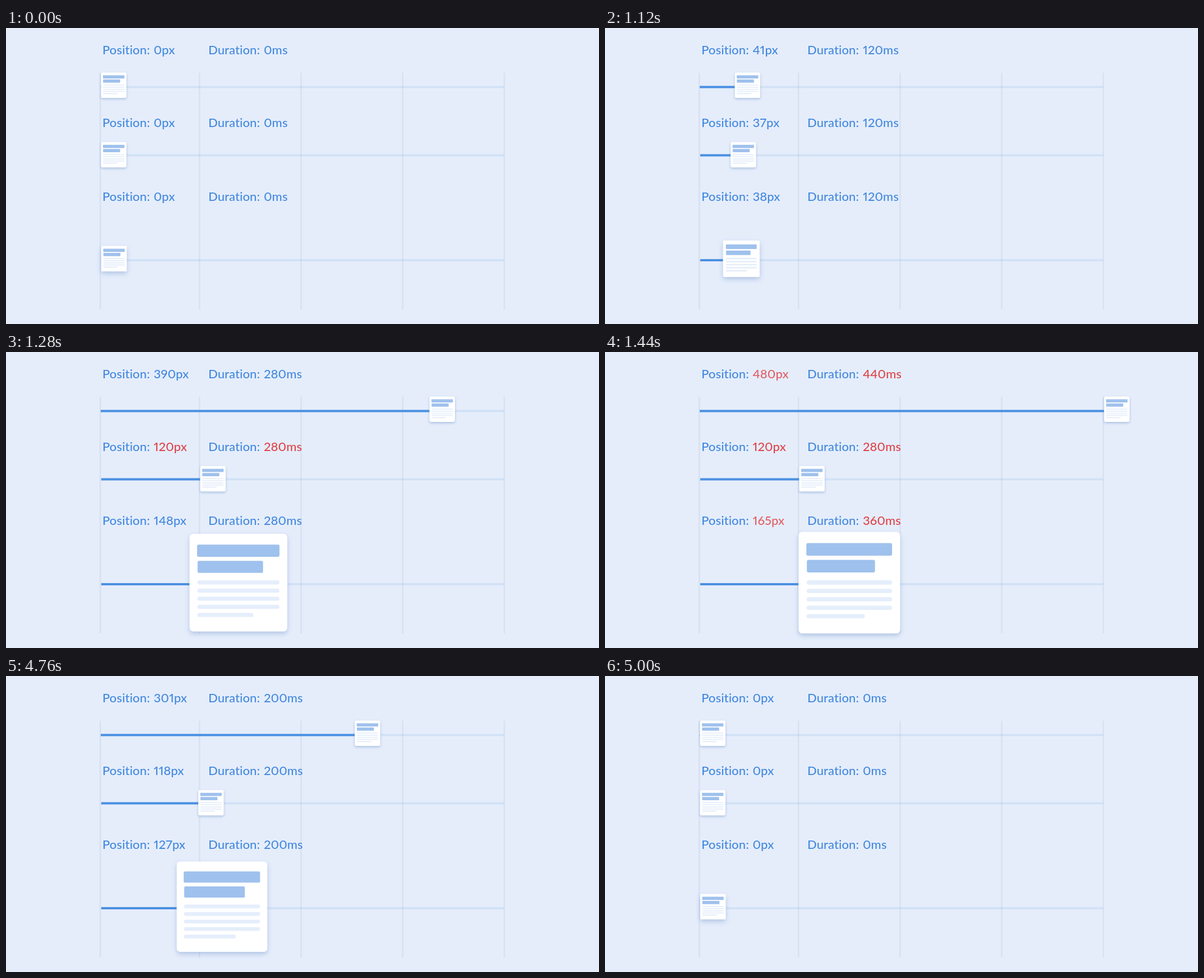
An HTML page for the animation above (6000 ms loop, 1058 by 529 pixels).

```html
<!DOCTYPE html>
<html lang="en">
<head>
<meta charset="utf-8">
<title>Duration by distance</title>
<style>
  html, body { margin: 0; width: 100%; height: 100%; overflow: hidden; background: #e5edfb; }
  svg { display: block; width: 1058px; height: 529px; }
  text { font: 500 22px Lato, "Open Sans", sans-serif; fill: #4389de; letter-spacing: .1px;
         font-variant-numeric: proportional-nums; }
  .grid { fill: #8fa6c6; fill-opacity: .17; }
  .track { fill: #d2e2f6; }
  .active { fill: #4a90e2; }
  .card { fill: #fff; filter: drop-shadow(0 2px 2px rgba(70, 115, 180, .38)); }
  .big { filter: drop-shadow(0 4px 4px rgba(70, 115, 180, .32)); }
  .title { fill: #9fc1ed; }
  .line { fill: #e5eefb; }
</style>
</head>
<body>
<svg id="stage" viewBox="0 0 1058 529"></svg>
<script>
const LOOP = 6000, STEP = 40, START = 1000, END = 5000;
const SMALL = 45.4, LARGE = 181.5;
const stage = document.getElementById('stage');

function add(parent, tag, attrs) {
  const el = document.createElementNS('http://www.w3.org/2000/svg', tag);
  set(el, attrs);
  return parent.appendChild(el);
}

function set(el, attrs) {
  for (const key in attrs) el.setAttribute(key, attrs[key]);
}

function box(parent, cls, x, y, width, height, rx = 0) {
  return add(parent, 'rect', { class: cls, x, y, width, height, rx });
}

function label(x, y, str = '') {
  const el = add(stage, 'text', { x, y });
  el.textContent = str;
  return el;
}

// Symmetric cubic Bezier (a, 0, 1 - a, 1), solved by bisection
function ease(x, a) {
  if (x <= 0 || x >= 1) return x <= 0 ? 0 : 1;
  let lo = 0, hi = 1, s;
  for (let i = 0; i < 30; i++) {
    s = (lo + hi) / 2;
    const r = 1 - s;
    if (3 * r * r * s * a + 3 * r * s * s * (1 - a) + s * s * s < x) lo = s;
    else hi = s;
  }
  return s * s * (3 - 2 * s);
}

const rows = [
  { textY: 47, trackY: 105.5, cardY: 102.2, x0: 169.5, x1: 890.5, lineX: 169,
    px: 480, dur: 440, curve: .658, grow: 0, red: '#e25f66' },
  { textY: 177, trackY: 227.5, cardY: 226.5, x0: 169.5, x1: 346.5, lineX: 170,
    px: 120, dur: 280, curve: .658, grow: 0, red: '#e0444a' },
  { textY: 309, trackY: 415, cardY: 412.3, x0: 170, x1: 345.2, lineX: 170,
    px: 165, dur: 360, curve: .42, grow: LARGE - SMALL, red: '#e25f66' }
];

for (const r of rows) box(stage, 'track', 169, r.trackY - 2, 720, 4);
for (const x of [168.2, 345.2, 526.5, 707.8, 889]) box(stage, 'grid', x - 1.25, 80, 2.5, 423);

for (const r of rows) {
  r.active = box(stage, 'active', r.lineX, r.trackY - 2, 0, 4);
  label(172, r.textY, 'Position:');
  label(361, r.textY, 'Duration:');
  r.pos = label(263.5, r.textY);
  r.time = label(460, r.textY);
  r.card = box(stage, r.grow ? 'card big' : 'card', 0, 0, 0, 0);
  r.art = add(stage, 'g', {});
  box(r.art, 'title', 14, 20, 153, 22.5, 3);
  box(r.art, 'title', 15, 50, 121.5, 22.5, 3);
  for (let i = 0; i < 5; i++) box(r.art, 'line', 14.5, 86.5 + 15.1 * i, i < 4 ? 152.5 : 104, 7.6, 3.8);
}

function update(r, t) {
  const back = t >= LOOP / 2;
  const ms = Math.max(0, Math.min(r.dur, back ? END - t : t - START));
  const done = t >= START + r.dur && t < END - r.dur;
  const p = ease(ms / r.dur, r.curve);
  const growth = r.grow * ease(ms / r.dur, .658);
  const size = SMALL + growth;
  const x = r.x0 + (r.x1 - r.x0) * p;
  const y = r.cardY - size / 2;

  r.pos.textContent = Math.floor(r.px * p + .4) + 'px';
  r.time.textContent = (back && !done ? Math.max(0, ms - STEP) : ms) + 'ms';
  r.pos.style.fill = done ? r.red : '';
  r.time.style.fill = done ? '#e0444a' : '';
  set(r.active, { width: Math.max(0, x - r.lineX) });
  set(r.card, { x, y, width: size, height: size, rx: r.grow ? 1.5 + growth / 25 : 3 });
  set(r.art, { transform: `translate(${x} ${y}) scale(${size / LARGE})` });
}

function frame(now) {
  const t = Math.floor((now % LOOP) / STEP) * STEP;
  for (const r of rows) update(r, t);
  requestAnimationFrame(frame);
}
frame(performance.now());
</script>
</body>
</html>
```
